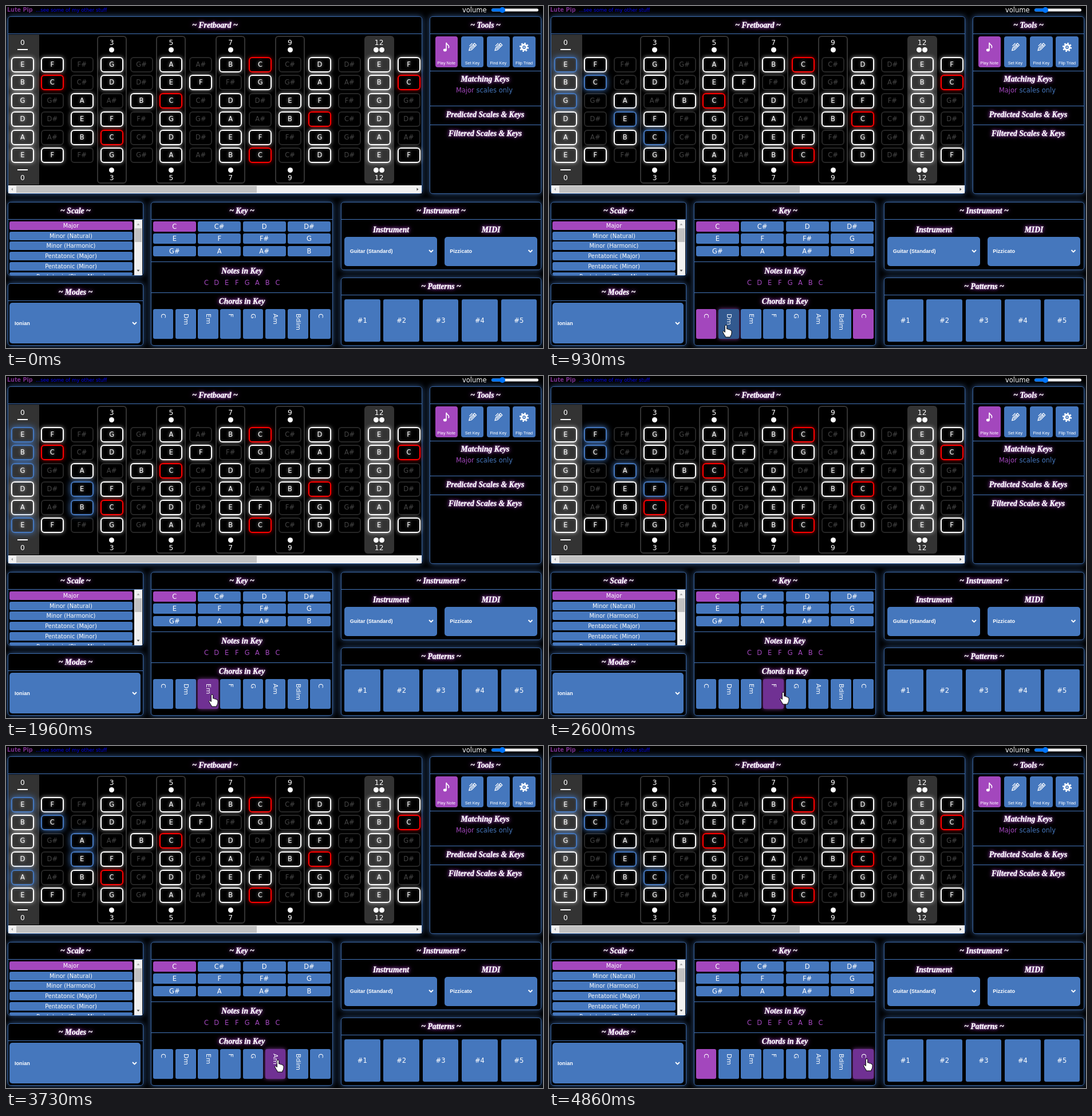
Animation of 938x597 px, one loop 5680 ms. Source, as an HTML page:

```html
<!DOCTYPE html>
<html lang="en">
<head>
<meta charset="utf-8">
<title>Fretboard reference</title>
<style>
html, body { margin: 0; width: 100%; height: 100%; overflow: hidden; background: #000; }
#stage { position: absolute; left: 0; top: 0; width: 938px; height: 597px; overflow: hidden;
  font: 11.5px "DejaVu Sans", sans-serif; color: #fff; }
#stage div { position: absolute; box-sizing: border-box; text-align: center; white-space: pre; }
#stage svg { position: absolute; left: 0; top: 0; }
.panel { border: 1px solid #3b68a6; border-radius: 5px; background: #000;
  box-shadow: 0 0 11px rgba(69,119,189,.75); }
.line { background: #4577bd; }
.btn { border-radius: 3px; background: #4577bd; overflow: hidden; }
#stage .on { background: #a347bd; }
#stage .head { font: italic bold 13.7px/20px "Liberation Serif", serif;
  -webkit-text-stroke: .35px #fff; text-shadow: 0 0 5px #a347bd, 0 0 9px #a347bd; }
#stage .sel { font: bold 9.1px/20px "Liberation Sans", sans-serif; text-align: left; }
#stage .note { border: 2px solid; border-radius: 6px; line-height: 23px; text-shadow: 0 0 5px rgba(255,255,255,.8); }
#stage .dim { color: #444; text-shadow: none; }
#stage .chord { writing-mode: vertical-rl; text-align: left; padding-top: 8px; line-height: 36px; font-size: 11.3px; }
</style>
</head>
<body>
<div id="stage"></div>
<script>
const stage = document.getElementById('stage');
const LOOP = 5680, FADE = 200;
const BLUE = [69, 119, 189], PURPLE = [163, 71, 189];

function box(x, y, w, h, cls = '', text = '', css = '') {
  const el = document.createElement('div');
  el.className = cls;
  el.style.cssText = `left:${x}px;top:${y}px;width:${w}px;height:${h}px;${css}`;
  el.textContent = text;
  stage.append(el);
  return el;
}
// Text centred on x, or starting there, with its capitals centred on y.
const label = (x, y, text, cls = '', css = '') =>
  box(x - 150, y - 10, 300, 20, cls, text, 'line-height:20px;' + css);
const labelAt = (x, y, text, cls = '', css = '') =>
  box(x, y - 10, 300, 20, cls, text, 'line-height:20px;text-align:left;' + css);
const head = (x, y, text) => label(x, y, text, 'head');
const button = (x, y, w, h, text, on, css = '') =>
  box(x, y, w, h, on ? 'btn on' : 'btn', text, `line-height:${h}px;${css}`);
const line = (x, y, w) => box(x, y, w, 1, 'line');

function panel(x, y, w, h, title, bar) {
  box(x, y, w, h, 'panel');
  head(x + w / 2, y + 16, `~ ${title} ~`);
  line(x + 1, y + 30, w - 2);
}

// Top bar
labelAt(2, 7, 'Lute Pip', '', 'font-size:9.6px;font-weight:bold;color:#7a2f8c');
labelAt(52, 7, '...see some of my other stuff', '', 'font-size:8.6px;color:#00e');
labelAt(797, 7, 'volume');

panel(3, 18, 724, 310, 'Fretboard');
panel(740, 18, 195, 310, 'Tools');
panel(3, 342, 237, 129, 'Scale');
panel(3, 484, 237, 109, 'Modes');
panel(253, 342, 318, 251, 'Key');
panel(585, 342, 350, 119, 'Instrument');
panel(585, 474, 350, 119, 'Patterns');

// Fretboard
const NAMES = ['C', 'C#', 'D', 'D#', 'E', 'F', 'F#', 'G', 'G#', 'A', 'A#', 'B'];
const OPEN = [4, 11, 7, 2, 9, 4];
const fretX = f => 28.9 + f * 51.9;
const dot = (x, y) => box(x - 4.5, y - 4.5, 9, 9, '', '', 'border-radius:50%;background:#fff');

box(4, 50, 54, 262, '', '', 'background:#333');
box(626, 52, 52, 258, '', '', 'background:#333;border-radius:6px');
for (const f of [3, 5, 7, 9])
  box(fretX(f) - 26, 52, 52, 258, '', '', 'border:2px solid #333;border-radius:6px');
for (const f of [0, 3, 5, 7, 9, 12]) {
  const x = fretX(f);
  for (const [numY, dotY] of [[64, 76], [300, 286]]) {
    label(x, numY, f, '', 'font-size:12.3px');
    if (!f) box(x - 9, dotY - 1, 18, 2, '', '', 'background:#fff');
    else if (f === 12) { dot(x - 5, dotY); dot(x + 5, dotY); }
    else dot(x, dotY);
  }
}

const cells = OPEN.map((open, s) => Array.from({ length: 14 }, (_, f) => {
  const name = NAMES[(open + f) % 12], dim = name.length > 1;
  const el = box(fretX(f) - 20, 88.5 + s * 31.75, 40, 27, dim ? 'note dim' : 'note', name);
  const cell = { el, dim, base: name === 'C' ? [255, 0, 0] : [255, 255, 255] };
  paintNote(cell, 0);
  return cell;
}));

function mix(a, b, k) { return a.map((v, i) => Math.round(v + (b[i] - v) * k)); }

function paintNote({ el, dim, base }, k) {
  const c = mix(base, BLUE, k), a = dim ? .15 + .25 * k : 1;
  const glow = dim ? .3 * k : .6 + .4 * k;
  el.style.borderColor = `rgba(${c},${a})`;
  el.style.boxShadow = `0 0 ${7 + 4 * k}px rgba(${c},${glow}),inset 0 0 5px rgba(${c},${glow * .3})`;
}

// Scrollbars
box(4, 313, 722, 14, '', '', 'background:#f1f1f1');
box(18, 314, 420, 12, '', '', 'background:#c1c1c1');

// Tools
['Play Note', 'Set Key', 'Find Key', 'Flip Triad'].forEach((name, i) => {
  const x = 749.5 + i * 45.3;
  button(x, 53, 39.5, 54, '', !i, 'border-radius:4px');
  label(x + 19.7, 99.5, name, '', 'font:7.3px/20px "Liberation Sans",sans-serif');
});
line(741, 113, 193);
head(837, 128, 'Matching Keys');
label(835.5, 147, '').innerHTML = '<span style="color:#a347bd">Major</span> <span style="color:#4577bd">scales only</span>';
line(741, 174, 193);
head(837, 189.5, 'Predicted Scales & Keys');
line(741, 207, 193);
head(837, 222.5, 'Filtered Scales & Keys');

// Scales and modes
['Major', 'Minor (Natural)', 'Minor (Harmonic)', 'Pentatonic (Major)', 'Pentatonic (Minor)', 'Pentatonic (Blues Minor)']
  .forEach((name, i) => button(6, 376 + i * 17.7, 215, i < 5 ? 15 : 5.5, name, !i, 'font-size:9.9px;line-height:15px'));
box(224, 373, 14, 97, '', '', 'background:#f1f1f1');
box(225, 388, 12, 24, '', '', 'background:#c1c1c1');
button(6, 518, 229, 71, '', 0, 'border-radius:5px');
labelAt(15, 553.5, 'Ionian', 'sel');

// Keys, notes and chords
['C', 'C#', 'D', 'D#', 'E', 'F', 'F#', 'G', 'G#', 'A', 'A#', 'B'].forEach((name, i) =>
  button(256.7 + i % 4 * 78.4, 376 + (i >> 2) * 21.3, 75.2, 18, name, !i));
line(254, 446, 316);
head(412, 462.5, 'Notes in Key');
[...'CDEFGABC'].forEach((n, i) => label(350 + i * 17.8, 483, n, '', 'color:#a347bd'));
line(254, 500, 316);
head(412, 516, 'Chords in Key');
const chords = ['C', 'Dm', 'Em', 'F', 'G', 'Am', 'Bdim', 'C'].map((name, i) =>
  box(256.7 + i * 39.2, 529, 35.8, 52, 'btn chord', name));

// Instrument and patterns
[[591, 672.5, 'Instrument', 'Guitar (Standard)'], [765.5, 847, 'MIDI', 'Pizzicato']].forEach(([x, mid, title, value]) => {
  head(mid, 391, title);
  button(x, 402.5, 162, 51, '', 0, 'border-radius:5px');
  labelAt(x + 9.7, 428, value, 'sel');
});
for (let i = 0; i < 5; i++) button(591 + i * 68.4, 511.5, 62.5, 74.5, '#' + (i + 1));

// Icons, arrows, slider and pointer
const chevron = (x, y) => `<path d="M${x - 3.5} ${y - 2}l3.5 3.5l3.5-3.5" fill="none" stroke="#fff" stroke-width="1.8"/>`;
const pencil = x => `<g transform="translate(${x} 72) rotate(45)" fill="none" stroke="#fff" stroke-width="1.3">
  <path d="M-2.3-7.5h4.6v11.5l-2.3 4l-2.3-4zM-2.3-4.5h4.6M0-4v8"/><path d="M-5-5v7"/></g>`;
stage.insertAdjacentHTML('beforeend', `<svg width="938" height="597">
  <rect x="848" y="4.5" width="82" height="5" rx="2.5" fill="#efefef"/>
  <rect x="848" y="4.5" width="20" height="5" rx="2.5" fill="#0075ff"/>
  <circle cx="867" cy="7" r="5" fill="#0075ff"/>
  <path d="M12 317.5v5l-3-2.5z" fill="#a3a3a3"/><path d="M717.5 317.5v5l3-2.5z" fill="#505050"/>
  <path d="M228.5 382.5h5l-2.5-3z" fill="#a3a3a3"/><path d="M228.5 460.5h5l-2.5 3z" fill="#505050"/>
  <ellipse cx="766.8" cy="77" rx="3" ry="2.4" fill="#fff"/>
  <path d="M769 77V64q1 3 3.5 4.500q2 2 .5 5" fill="none" stroke="#fff" stroke-width="1.6"/>
  ${pencil(814.5)}${pencil(859.8)}
  <g fill="none" stroke="#fff"><circle cx="905" cy="72" r="4.4" stroke-width="3"/>
  <circle cx="905" cy="72" r="6.8" stroke-width="2.6" stroke-dasharray="2.67"/>
  <circle cx="905" cy="72" r="1" stroke-width="1"/></g>
  ${chevron(224.5, 554)}${chevron(742.5, 428)}${chevron(916, 428)}
  <path id="hand" fill="#fff" stroke="#000" stroke-linejoin="round"
    d="M-1.7 1.500Q-1.600 0 0 0T1.700 1.500V7Q4 6 4.600 8Q7 7 7.600 9Q10 8.500 10 11V14Q10 17 8 19V21H-1V19.500Q-3 17-5 13Q-6 11-4.500 10.500Q-3 10.500-1.700 12.500Z"/>
</svg>`);
const hand = document.getElementById('hand');

// Frets per string, highest string first
const SHAPES = ['01023-', '1320--', '000220', '1123--', '300023', '01220-', '1010--', '01023-'];
const CLICKS = [370, 1180, 1760, 2350, 2950, 3470, 4060, 4660];
const HOVERS = [200, 705, 1455, 2045, 2710, 3110, 3820, 4400];
const PATH = [
  [40, 263, 594], [340, 275, 562], [620, 275, 562], [800, 309, 557], [1390, 309, 557], [1530, 354, 557],
  [1770, 354, 557], [1960, 360, 556], [1990, 361, 556], [2150, 409, 553], [2600, 409, 552], [2640, 410, 552],
  [2800, 440, 550], [3000, 441, 550], [3220, 475, 548], [3740, 475, 548], [3920, 521, 548],
  [4070, 521, 548], [4230, 527, 547], [4390, 528, 547], [4540, 555, 546], [LOOP, 555, 546]
];

const clamp = v => Math.max(0, Math.min(1, v));
const fade = (t, at) => 1 - (1 - clamp((t - at) / FADE)) ** 2;
const span = (t, times, i) => fade(t, times[i]) - (i < 7 ? fade(t, times[i + 1]) : 0);

const marked = new Map();
SHAPES.forEach((shape, i) => [...shape].forEach((fret, s) => {
  if (fret === '-') return;
  const cell = cells[s][+fret];
  marked.set(cell, [...(marked.get(cell) || []), i]);
}));

function pointer(t) {
  const i = Math.max(1, PATH.findIndex(p => p[0] > t));
  const [a, b] = [PATH[i - 1], PATH[i]];
  const p = clamp((t - a[0]) / (b[0] - a[0])), k = p * p * (3 - 2 * p);
  return [a[1] + (b[1] - a[1]) * k, a[2] + (b[2] - a[2]) * k];
}

function draw(t) {
  const active = CLICKS.map((_, i) => span(t, CLICKS, i));
  marked.forEach((list, cell) => paintNote(cell, clamp(list.reduce((sum, i) => sum + active[i], 0))));
  chords.forEach((el, i) => {
    const on = i % 7 ? active[i] : active[0] + active[7];
    const over = span(t, HOVERS, i);
    el.style.background = `rgb(${mix(mix(BLUE, PURPLE, on), mix([50, 89, 143], [112, 49, 147], on), over)})`;
    el.style.boxShadow = `0 0 7px rgba(${PURPLE},${over * .8})`;
  });
  hand.style.display = t < 40 ? 'none' : '';
  hand.setAttribute('transform', `translate(${pointer(t).map(v => Math.round(v))})`);
}

let start;
function tick(now) {
  start ??= now;
  draw((now - start) % LOOP);
  requestAnimationFrame(tick);
}
draw(0);
requestAnimationFrame(tick);
</script>
</body>
</html>
```
